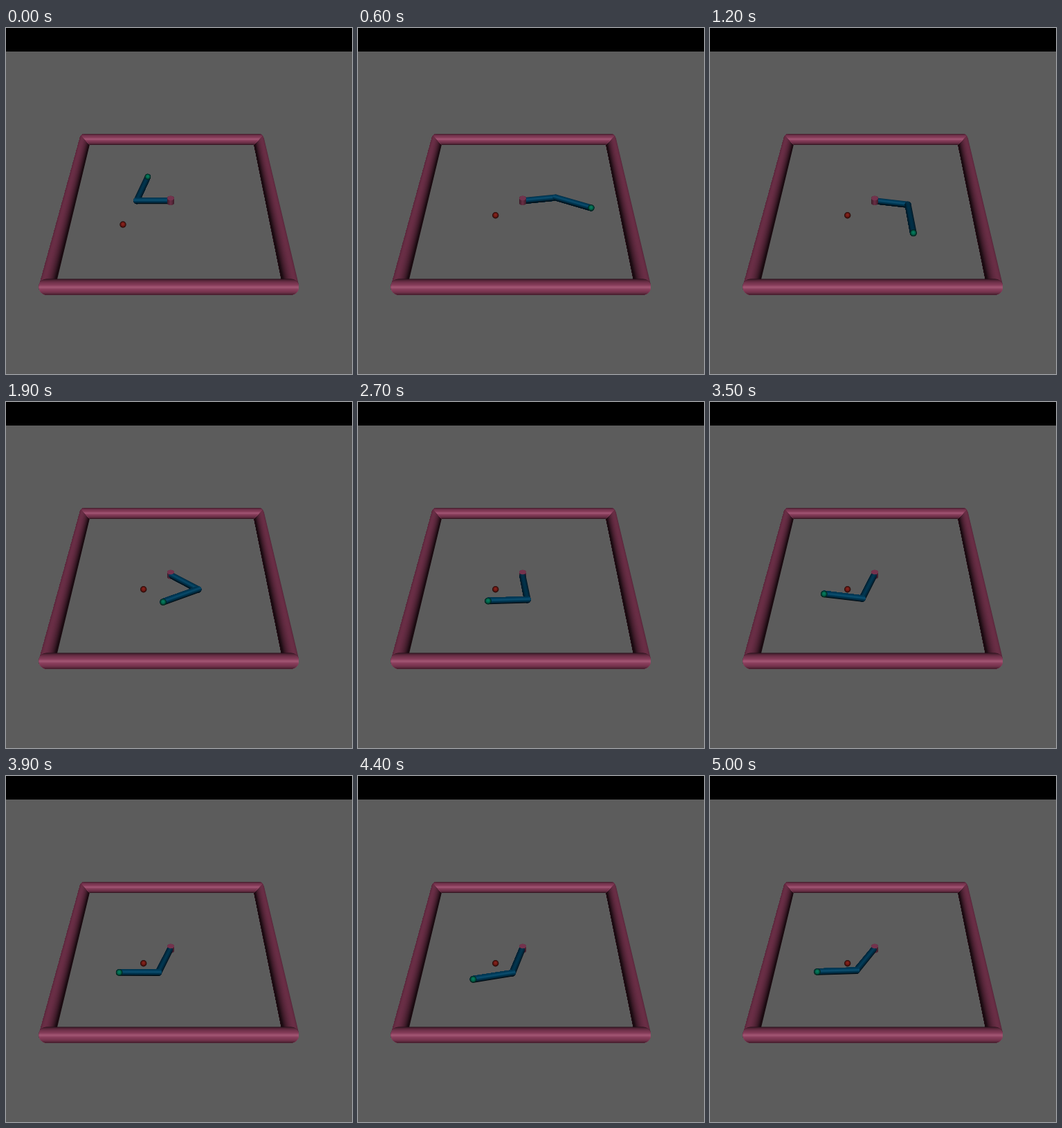
Animation of 500 by 500 pixels, one loop 5100 ms. Source, as an HTML page with a canvas:

```html
<!DOCTYPE html>
<html lang="en">
<head>
<meta charset="utf-8">
<title>Two-link arm</title>
<style>
  html, body { margin: 0; width: 100%; height: 100%; overflow: hidden; background: #5c5c5c; }
  canvas { display: block; width: 500px; height: 500px; }
</style>
</head>
<body>
<canvas id="stage" width="500" height="500"></canvas>
<script>
const LOOP = 5100, STEP = 100;
const PINK = [230, 102, 153], BLUE = [0, 102, 153], GREEN = [0, 204, 153], RED = [230, 51, 40];

// time in ms, angle of upper link, angle of lower link (clockwise on screen)
const POSES = [
  [100, -0.03, 0.03],
  [600, -0.137, 0.397],
  [1900, 0.636, 2.69],
  [2700, 1.413, 3.1],
  [3500, 1.905, 3.3],
  [4400, 1.84, 2.93],
  [5000, 2.085, 3.1]
];
const FIRST = [Math.PI, -1.32];

const canvas = document.getElementById('stage');
let ctx = canvas.getContext('2d');

// Ground plane to screen; y grows towards the camera.
function project(x, y) {
  const w = 1 - 0.558 * y;
  return { x: (237.6 - 140 * y + 488.4 * x) / w, y: (249.7 + 205.7 * y) / w, s: 1 / w };
}

function slope(i, k) {
  if (i === 0) return 0;
  const a = POSES[i - 1], b = POSES[Math.min(i + 1, POSES.length - 1)];
  return (b[k] - a[k]) / (b[0] - a[0]);
}

function angleAt(t, k) {
  let i = 0;
  while (i < POSES.length - 2 && t >= POSES[i + 1][0]) i++;
  const p = POSES[i], q = POSES[i + 1], h = q[0] - p[0];
  const u = (t - p[0]) / h, u2 = u * u, u3 = u2 * u;
  return p[k] * (2 * u3 - 3 * u2 + 1) + q[k] * (3 * u2 - 2 * u3) +
    h * (slope(i, k) * (u3 - 2 * u2 + u) + slope(i + 1, k) * (u3 - u2));
}

function shade(color, k, add = 0) {
  return `rgb(${color.map(c => Math.round(Math.min(255, c * k + add))).join(',')})`;
}

// Tapered capsule, shaded across its width.
function tube(p, rp, q, rq, color, { amb = 0.12, dif = 0.47, off = 0, spec = 0 }) {
  const ang = Math.atan2(q.y - p.y, q.x - p.x);
  const len = Math.hypot(q.x - p.x, q.y - p.y);
  const bands = Math.ceil(Math.max(rp, rq) * 3);
  ctx.save();
  ctx.translate(p.x, p.y);
  ctx.rotate(ang);
  ctx.beginPath();
  ctx.arc(0, 0, rp, Math.PI / 2, Math.PI * 1.5);
  ctx.arc(len, 0, rq, -Math.PI / 2, Math.PI / 2);
  ctx.closePath();
  ctx.clip();
  const grow = (rq - rp) / len, r0 = rp - grow * rp, r1 = rq + grow * rq;
  for (let i = 0; i < bands; i++) {
    const v = -1 + 2 * i / bands, m = v + 1 / bands;
    const lit = Math.max(0, Math.cos(Math.asin(m) - off));
    const glow = spec * Math.exp(-((m - off / 2) ** 2) / 0.04);
    ctx.fillStyle = shade(color, amb + dif * lit, glow);
    ctx.beginPath();
    ctx.moveTo(-rp, v * r0 * (i ? 1 : 2));
    ctx.lineTo(len + rq, v * r1 * (i ? 1 : 2));
    ctx.lineTo(len + rq, r1 * 2);
    ctx.lineTo(-rp, r0 * 2);
    ctx.fill();
  }
  ctx.restore();
}

function ball(x, y, r, color, k) {
  const g = ctx.createRadialGradient(x, y - r * 0.2, 0, x, y, r);
  g.addColorStop(0, shade(color, k, 8));
  g.addColorStop(0.55, shade(color, k * 0.8));
  g.addColorStop(1, shade(color, k * 0.22));
  ctx.fillStyle = g;
  ctx.beginPath();
  ctx.arc(x, y, r, 0, Math.PI * 2);
  ctx.fill();
}

function drawRoom() {
  ctx.fillStyle = '#5c5c5c';
  ctx.fillRect(0, 0, 500, 500);
  ctx.fillStyle = '#000';
  ctx.fillRect(0, 0, 500, 34);
  const bl = { x: 114.5, y: 161 }, br = { x: 365, y: 161 };
  const fl = { x: 59, y: 374 }, fr = { x: 411.5, y: 374 };
  const side = { amb: 0.12, dif: 0.34, off: 0.65 };
  tube(bl, 8, { x: 60.5, y: 370 }, 11.5, PINK, side);
  tube(br, 8, { x: 411, y: 370 }, 11.5, PINK, { ...side, off: -side.off });

  // The back bar meets the side bars in a mitre.
  ctx.save();
  ctx.beginPath();
  ctx.moveTo(104, 150);
  ctx.lineTo(376, 150);
  ctx.lineTo(357, 170);
  ctx.lineTo(122, 170);
  ctx.clip();
  tube(bl, 8, br, 8, PINK, { off: -0.1, spec: 24 });
  ctx.restore();
  tube(fl, 11.5, fr, 11.5, PINK, { off: 0.1, spec: 24 });
}

function link(p, q, angle) {
  const c = Math.abs(Math.cos(angle));
  tube(p, 4.5 * p.s, q, 4.5 * q.s, BLUE, {
    amb: 0.08, dif: 0.36 + 0.2 * c, off: -0.4 * Math.cos(angle), spec: 16 * c
  });
}

function lid() {
  ctx.fillStyle = shade(PINK, 0.5);
  ctx.beginPath();
  ctx.ellipse(238, 246, 5, 3.2, 0, 0, Math.PI * 2);
  ctx.fill();
}

function post() {
  const g = ctx.createLinearGradient(233, 0, 243, 0);
  g.addColorStop(0, shade(PINK, 0.26));
  g.addColorStop(0.5, shade(PINK, 0.46));
  g.addColorStop(1, shade(PINK, 0.26));
  ctx.fillStyle = g;
  ctx.beginPath();
  ctx.ellipse(238, 246, 5, 3.2, 0, Math.PI, 0);
  ctx.ellipse(238, 253, 5, 3, 0, 0, Math.PI);
  ctx.fill();
  lid();
}

function drawArm(a, b) {
  const ex = 0.1 * Math.cos(a), ey = 0.1 * Math.sin(a);
  const root = project(ex * 0.06, ey * 0.06), elbow = project(ex, ey);
  const tip = project(ex + 0.11 * Math.cos(b), ey + 0.11 * Math.sin(b));
  const upper = () => {
    post();
    link(root, elbow, a);
    if (Math.sin(a) < 0.25) post();
    else lid();
  };
  const lower = () => {
    link(elbow, tip, b);
    ball(tip.x, tip.y, 4.6 * tip.s, GREEN, 0.6);
  };
  const order = Math.sin(b) < -0.2 ? [lower, upper] : [upper, lower];
  order.forEach(draw => draw());
}

// The room never changes, so it is drawn once.
const room = document.createElement('canvas');
room.width = room.height = 500;
const screen2d = ctx;
ctx = room.getContext('2d');
drawRoom();
ctx = screen2d;

const start = performance.now();
function frame() {
  const t = Math.floor(((performance.now() - start) % LOOP) / STEP) * STEP;
  const opening = t < STEP;
  ctx.drawImage(room, 0, 0);
  if (opening) ball(169, 284, 4.7, RED, 0.6);
  else ball(198.7, 270.7, 4.7, RED, 0.58);
  drawArm(...(opening ? FIRST : [angleAt(t, 1), angleAt(t, 2)]));
  requestAnimationFrame(frame);
}
frame();
</script>
</body>
</html>
```
